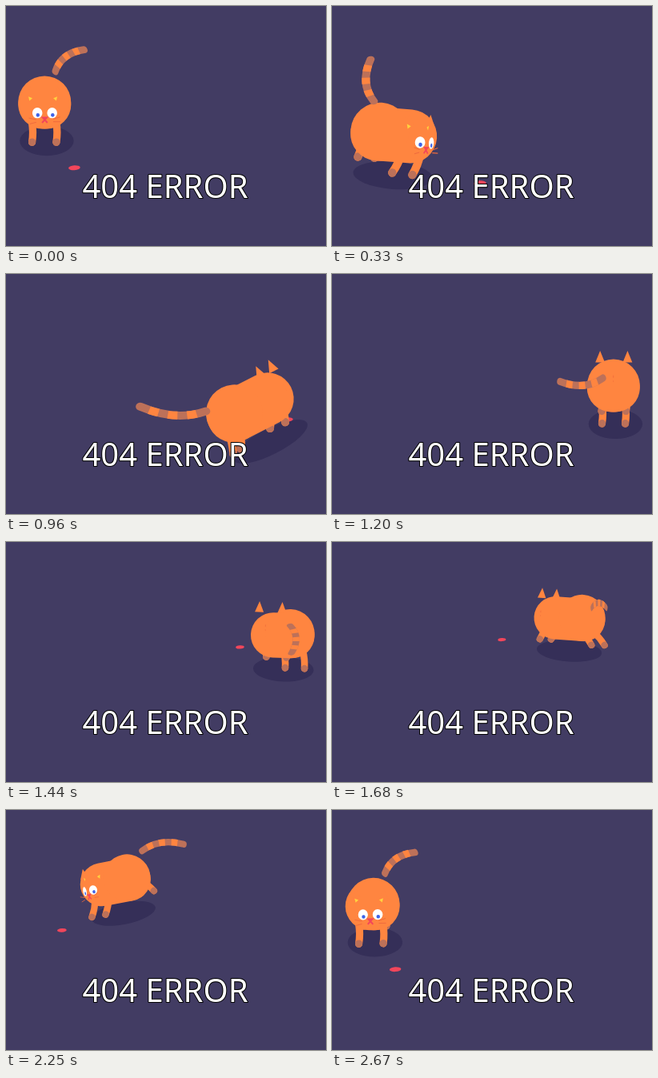
These frames come from a looping animation (400 by 300 pixels, 2.7 s). An HTML page without scripts:

```html
<!DOCTYPE html>
<html lang="en">
<head>
<meta charset="utf-8">
<title>404 error</title>
<style>
  @property --lap    { syntax: "<angle>";  inherits: true; initial-value: 0deg; }
  @property --aim    { syntax: "<angle>";  inherits: true; initial-value: 37deg; }
  @property --yaw    { syntax: "<angle>";  inherits: true; initial-value: 0deg; }
  @property --tilt   { syntax: "<angle>";  inherits: true; initial-value: 0deg; }
  @property --stride { syntax: "<angle>";  inherits: true; initial-value: 0deg; }
  @property --tail   { syntax: "<angle>";  inherits: true; initial-value: -37deg; }
  @property --reach  { syntax: "<number>"; inherits: true; initial-value: .7; }

  /* lap: cat on its track, aim: laser dot on its track, yaw: where the cat faces (0 = viewer) */
  @keyframes chase {
    0%    { --lap: 0deg; --aim: 37deg; --yaw: 0deg; --tilt: 0deg; --stride: 0deg; --tail: -37deg; --reach: .7; }
    22.2% { --aim: 119deg; --yaw: 84deg; --tilt: 8deg; --tail: -149deg; --reach: .75; }
    35.6% { --yaw: 118deg; --tilt: -27deg; --tail: -149deg; --reach: 1.15; }
    44.4% { --lap: 180deg; --yaw: 180deg; --tilt: 0deg; --tail: -184deg; --reach: .82; }
    62.2% { --lap: 243deg; --aim: 267deg; --yaw: 233deg; --tilt: 4deg; --tail: -364deg; --reach: .32; }
    83.3% { --lap: 306deg; --aim: 334deg; --yaw: 310deg; --tilt: -11deg; --tail: -358deg; --reach: .9; }
    100%  { --lap: 360deg; --aim: 397deg; --yaw: 360deg; --tilt: 0deg; --stride: 1800deg; --tail: -397deg; --reach: .7; }
  }

  html, body { margin: 0; width: 100%; height: 100%; overflow: hidden; background: #423c63; }
  svg { display: block; width: 100vw; height: 100vh; animation: chase 2.7s linear infinite; }

  /* Inside .track the cat's body is 100 units high */
  .track {
    --side: max(sin(var(--yaw)), -1 * sin(var(--yaw)));
    translate: calc(200px - 155px * cos(var(--lap) - 12deg)) calc(130px + 46.5px * sin(var(--lap) - 12deg));
    scale: calc(.66 + .09 * sin(var(--lap)));
  }
  .tilted { rotate: var(--tilt); }

  /* Projects a point f forward, s sideways and h down from the cat's middle */
  .at {
    translate: calc(1px * (var(--f) * sin(var(--yaw)) + var(--s) * cos(var(--yaw))))
               calc(1px * (var(--h) + .3 * var(--f) * cos(var(--yaw))));
  }
  .facing { scale: max(0, cos(var(--yaw) + var(--turn, 0deg))) 1; }

  .shadow {
    fill: #352f58;
    cx: 4px; cy: 73px;
    rx: calc(51px + 24px * var(--side)); ry: calc(28px - 6px * var(--side));
  }
  .dot {
    fill: #f2465b;
    translate: calc(205px - 150px * cos(var(--aim))) calc(172px + 50px * sin(var(--aim)));
    scale: calc(.9 + .2 * sin(var(--aim)));
    rotate: -4deg;
  }

  .fur { fill: #ff8540; }
  .torso {
    x: calc(-50px - 33.5px * var(--side)); y: -42px;
    width: calc(100px + 67px * var(--side)); height: 92px; rx: 46px;
  }
  .rump { cx: calc(-33.5px * sin(var(--yaw))); }

  .leg, .tail { fill: none; stroke-linecap: round; stroke-width: 14px; }
  .leg { stroke: #ff8540; --swing: cos(var(--stride) - var(--lag)); }
  .front { --f: 45; --h: 25; rotate: calc(-30deg * sin(var(--yaw)) * var(--swing)); }
  .hind { --f: -50; --h: 20; rotate: calc(sin(var(--yaw)) * (35deg + 20deg * var(--swing))); }
  .paw { stroke: #bd7159; stroke-dasharray: .1 20; stroke-dashoffset: -9.9; }

  .tail { --f: -72; --s: 20; --h: -36; stroke: #bd7159; rotate: var(--tail); scale: var(--reach) 1; }
  .bands { stroke: #ff8540; stroke-linecap: butt; stroke-dasharray: 1; stroke-dashoffset: 1; }

  .ear { --f: 60; --h: -42; }
  .mark { fill: #ffd23f; }
  .eye { --f: 77; --h: -3; fill: #fff; }
  .pupil { fill: #3d62e8; }
  .muzzle { --f: 79; --s: 0; --h: 9; fill: none; stroke: #ee6b3e; stroke-width: 1.5px; }
  .nose { fill: #f2465b; stroke: #f2465b; stroke-width: 3px; }
  .left { --turn: -18deg; }
  .right { --turn: 18deg; }

  text { font: 40px "Noto Sans", "Open Sans", sans-serif; text-anchor: middle; fill: #fff;
         stroke: #000; stroke-width: 2px; stroke-linejoin: round; paint-order: stroke; }
</style>
</head>
<body>
<svg viewBox="0 0 400 300">
  <defs>
    <path id="limb" d="M0 0Q3 18 0 37" pathLength="10"/>
    <g id="leg"><use href="#limb"/><use href="#limb" class="paw"/></g>
    <path id="tail" d="M0 0Q45-22 100 0" pathLength="7"/>
    <path id="ear" d="M0-6L9 16H-9Z"/>
    <path id="mark" d="M-4 13L4 16L-2 21Z"/>
    <g id="eye"><circle r="10"/><circle class="pupil" cx="1" cy="4" r="3.6"/></g>
  </defs>

  <g class="track"><g class="tilted"><ellipse class="shadow"/></g></g>
  <ellipse class="dot" rx="7.2" ry="2.9"/>

  <g class="track">
    <g class="tilted">
      <use href="#leg" class="at leg hind" style="--s: -22; --lag: 40deg"/>
      <use href="#leg" class="at leg hind" style="--s: 22; --lag: 80deg"/>
      <use href="#leg" class="at leg front" style="--s: -24; --lag: 40deg"/>
      <use href="#leg" class="at leg front" style="--s: 22; --lag: 80deg"/>

      <g class="fur">
        <rect class="torso"/>
        <circle class="rump" r="50"/>
        <use href="#ear" class="at ear" style="--s: -27"/>
        <use href="#ear" class="at ear" style="--s: 25"/>
      </g>

      <g class="at ear" style="--s: -27"><use href="#mark" class="mark facing left"/></g>
      <g class="at ear" style="--s: 20"><use href="#mark" class="mark facing right" transform="scale(-1 1)"/></g>
      <use href="#eye" class="at eye facing left" style="--s: -14"/>
      <use href="#eye" class="at eye facing right" style="--s: 14"/>
      <g class="at muzzle facing">
        <path d="M-16 0l-14-3M-16 5l-12 3M16-1l13-4M16 4h14"/>
        <path class="nose" d="M-4-4H4L0 0ZM0 0L-5 6M0 0L5 6"/>
      </g>

      <g class="at tail"><use href="#tail"/><use href="#tail" class="bands"/></g>
    </g>
  </g>

  <text x="199" y="240">404 ERROR</text>
</svg>
</body>
</html>
```
